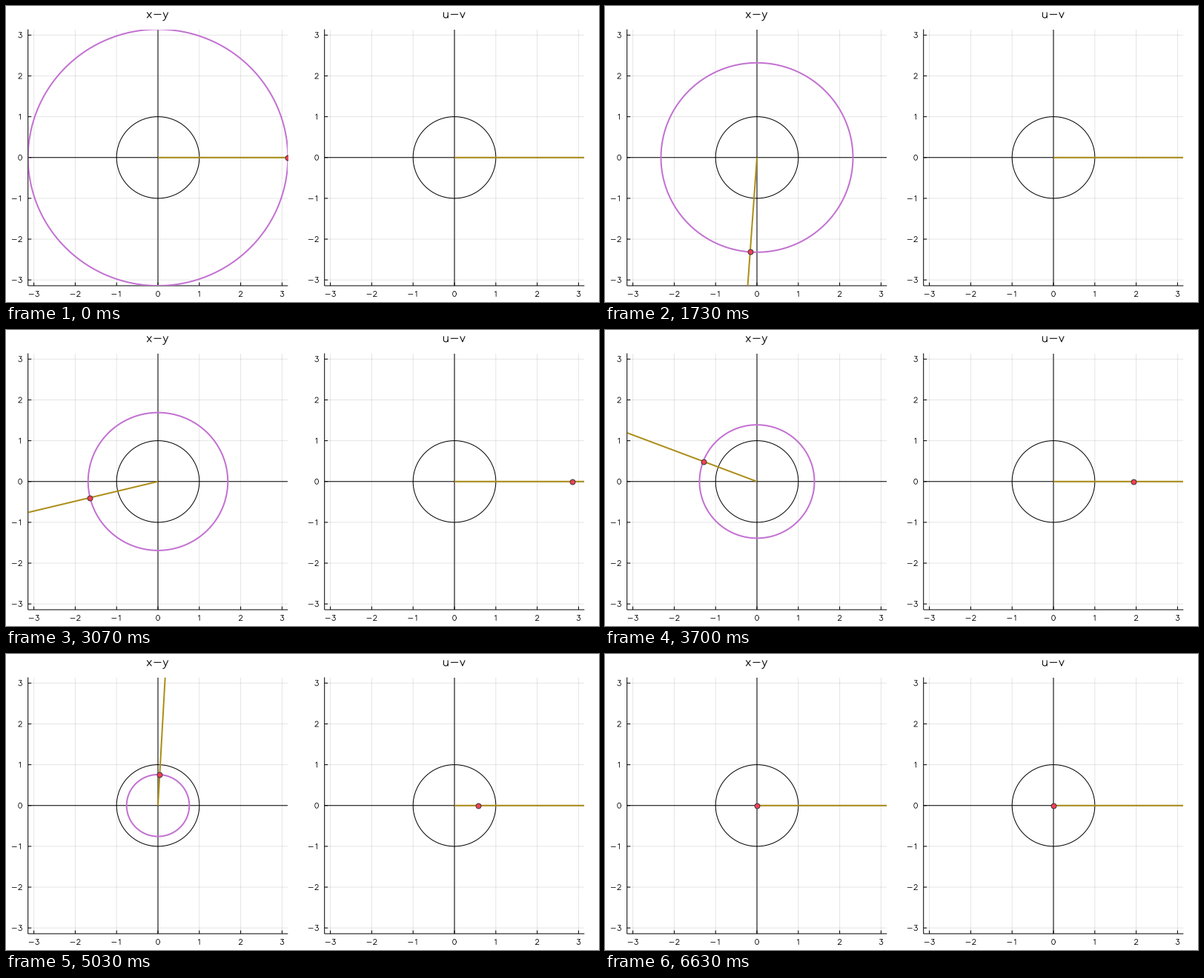
A matplotlib script that plays this animation: 800 px wide and 400 px high, repeating every 6.66 s.

```python
import numpy as np
import matplotlib.pyplot as plt
from matplotlib.animation import FuncAnimation
from matplotlib.collections import LineCollection

W, H, DPI = 800, 400, 100
LOOP, TICK = 6660, 20
STEPS, STEP_MS = 200, 100 / 3
PX = 72 / DPI
PI = np.pi
LEFT, RIGHT, TOP, BOTTOM = 29.7, 380.3, 31.5, 378.0
PURPLE, GOLD, RED = "#c371d2", "#ac8e18", "#ef4055"

plt.rcParams["path.snap"] = False
plt.rcParams["lines.solid_capstyle"] = "butt"


def arc(cx, cy, rx, ry, start=0, end=360, n=24):
    t = np.radians(np.linspace(start, end, n))
    return list(zip(cx + rx * np.cos(t), cy + ry * np.sin(t)))


# Single-stroke letters: advance width and polylines, capitals 21 units high
GLYPHS = {
    "0": (20, [arc(10, 10.5, 7, 10.5)]),
    "1": (20, [[(6, 17), (11, 21), (11, 0)]]),
    "2": (20, [arc(10, 15, 6, 6, 170, -35) + [(3, 0), (17, 0)]]),
    "3": (20, [[(5, 21), (16, 21), (10, 13)] + arc(10, 6.5, 7, 6.5, 75, -160)]),
    "-": (26, [[(4, 9), (22, 9)]]),
    "x": (17, [[(3, 14), (14, 0)], [(14, 14), (3, 0)]]),
    "y": (16, [[(2, 14), (8, 0)], [(14, 14), (8, 0)] + arc(1, 0, 6, 7, -25, -90)]),
    "u": (19, [[(4, 14)] + arc(9.5, 5, 5.5, 5, 180, 360), [(15, 14), (15, 0)]]),
    "v": (16, [[(2, 14), (8, 0), (14, 14)]]),
}

fig = plt.figure(figsize=(W / DPI, H / DPI), dpi=DPI, facecolor="white")
page = fig.add_axes([0, 0, 1, 1])
page.set(xlim=(0, W), ylim=(H, 0))
page.axis("off")


def strokes(text, x, base, scale, align=0.5):
    """Polylines of a text; align 0.5 centres it, 1 sets it flush right."""
    x -= align * scale * sum(GLYPHS[c][0] for c in text)
    lines = []
    for c in text:
        width, parts = GLYPHS[c]
        lines += [np.array(p) * [scale, -scale] + [x, base] for p in parts]
        x += scale * width
    return lines


def add_lines(ax, lines, lw=1.0, **style):
    ax.add_collection(LineCollection(lines, colors="black", linewidths=lw * PX, **style),
                      autolim=False)


def panel(title, dx):
    box = [(dx + LEFT) / W, 1 - BOTTOM / H, (RIGHT - LEFT) / W, (BOTTOM - TOP) / H]
    ax = fig.add_axes(box)
    ax.set(xlim=(-PI, PI), ylim=(-PI, PI))
    ax.axis("off")

    mid_x, mid_y = dx + (LEFT + RIGHT) / 2, (TOP + BOTTOM) / 2
    unit_x, unit_y = (RIGHT - LEFT) / (2 * PI), (BOTTOM - TOP) / (2 * PI)
    scale = 0.34
    half = 10.5 * scale
    tick_x, tick_y = 4.5 / unit_x, 4.5 / unit_y

    grid, labels = [], []
    frame = [[(-PI, PI), (-PI, -PI)], [(-PI, -PI), (PI, -PI)]]
    for n in range(-3, 4):
        grid += [[(n, -PI), (n, PI)], [(-PI, n), (PI, n)]]
        frame += [[(n, -PI), (n, tick_y - PI)], [(-PI, n), (tick_x - PI, n)]]
        labels += strokes(str(n), mid_x + n * unit_x, 389 + half, scale)
        labels += strokes(str(n), dx + 22.5, mid_y - n * unit_y + half, scale, align=1)

    add_lines(ax, grid, alpha=0.1)
    add_lines(ax, frame, clip_on=False)
    add_lines(ax, [[(-PI, 0), (PI, 0)], [(0, -PI), (0, PI)], arc(0, 0, 1, 1, n=200)])
    add_lines(page, labels, 0.8, capstyle="round")
    add_lines(page, strokes(title, mid_x - 0.8, 16, 0.52), 1.05, capstyle="round")
    return ax


def ray(ax):
    return ax.plot([0, 10], [0, 0], color=GOLD, lw=2 * PX, zorder=4)[0]


def dot(ax):
    return ax.plot([], [], "o", ms=7 * PX, mfc=RED, mec="#303030",
                   mew=0.9 * PX, zorder=5)[0]


z_ax, w_ax = panel("x-y", 0), panel("u-v", 400)
ring = z_ax.plot([], [], color=PURPLE, lw=2 * PX, zorder=3)[0]
z_ray, z_dot = ray(z_ax), dot(z_ax)
ray(w_ax)
w_dot = dot(w_ax)


def update(i):
    # Radius and angle shrink together; the image point slides in at r squared
    step = round(i * TICK / STEP_MS)
    left = 1 - step / (STEPS - 1)
    r, a = PI * left, 2 * PI * left
    c, s = np.cos(a), np.sin(a)
    ring.set_data(*zip(*arc(0, 0, r, r, n=200)))
    z_ray.set_data([0, 10 * c], [0, 10 * s])
    z_dot.set_data([r * c], [r * s])
    w_dot.set_data([r * r], [0])
    return ring, z_ray, z_dot, w_dot


anim = FuncAnimation(fig, update, frames=LOOP // TICK, interval=TICK,
                     repeat=True, repeat_delay=0, blit=False)
plt.show()
```
